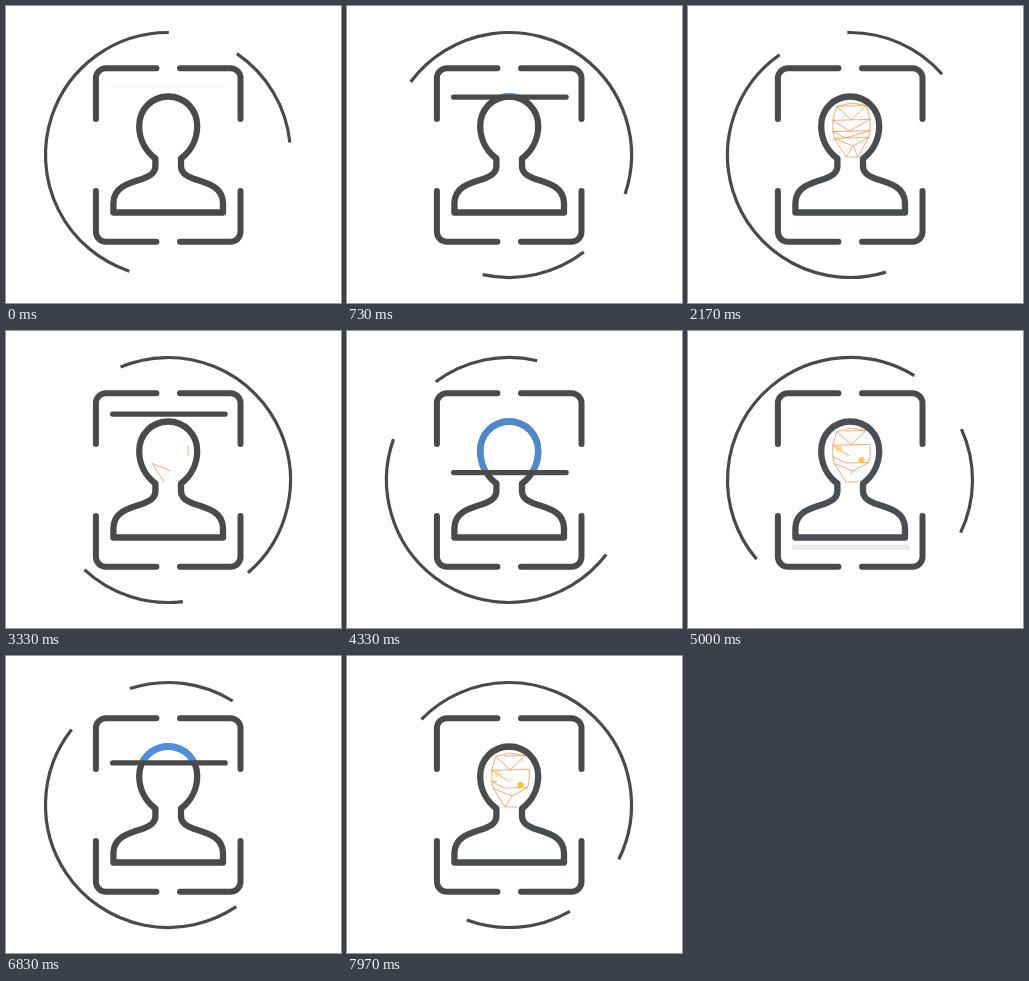
These frames come from a looping animation (335x297 px, 8000 ms). An HTML page with a canvas:

```html
<!DOCTYPE html>
<html lang="en">
<head>
<meta charset="utf-8">
<title>Face scan</title>
<style>
  html, body { margin: 0; width: 100%; height: 100%; overflow: hidden; background: #fff; }
  canvas { display: block; width: 335px; height: 297px; }
</style>
</head>
<body>
<canvas id="stage"></canvas>
<script>
const W = 335, H = 297, CX = 162.2, CY = 149;
const LOOP = 8000, STEP = 40, SCAN = 2900;
const DARK = '#4a4a4a', BLUE = '#4a90e2', ORANGE = '#f7873a', YELLOW = '#ffc21a';

const canvas = document.getElementById('stage');
const ctx = canvas.getContext('2d');
const ratio = window.devicePixelRatio || 1;
canvas.width = Math.round(W * ratio);
canvas.height = Math.round(H * ratio);

const clamp = v => Math.max(0, Math.min(1, v));
const smooth = (t, from, to) => {
  const s = clamp((t - from) / (to - from));
  return s * s * (3 - 2 * s);
};

// Cubic Bezier ease with end handles at (x1, 0) and (x2, 1).
function ease(s, x1, x2) {
  let lo = 0, hi = 1;
  for (let i = 0; i < 24; i++) {
    const u = (lo + hi) / 2, v = 1 - u;
    const x = 3 * x1 * u * v * v + 3 * x2 * u * u * v + u * u * u;
    if (x < s) lo = u; else hi = u;
  }
  return lo * lo * (3 - 2 * lo);
}

function randomizer(seed) {
  return () => (seed = (seed * 16807) % 2147483647) / 2147483647;
}

function makeCorners() {
  const path = new Path2D();
  for (const sx of [-1, 1]) {
    for (const sy of [-1, 1]) {
      const x = CX + sx * 72.3, y = CY + sy * 86.8;
      path.moveTo(x, CY + sy * 36);
      path.arcTo(x, y, CX + sx * 11.8, y, 10);
      path.lineTo(CX + sx * 11.8, y);
    }
  }
  return path;
}

// The right half of the bust, joined with its mirror image.
function makeBust() {
  const half = new Path2D(
    'M162.2 90.5 C178.5 90.5 191.2 103.5 191.2 120 C191.2 133 185 145 175 152.5' +
    ' V160 C175 167 180 170 187 172.5 C202 177 217 181 217 197 V206.5 H162.2');
  const path = new Path2D(half);
  path.addPath(half, new DOMMatrix([-1, 0, 0, 1, 2 * CX, 0]));
  return path;
}

// Rows of triangles inside an oval, closed by a fan at the chin.
function makeMesh() {
  const random = randomizer(11);
  const jitter = size => (random() - 0.5) * size;
  const edges = [], hub = [165, 140], chin = [[158, 151], [170, 151]];
  const link = (a, ...others) => others.forEach(b => edges.push([a, b]));
  let above = null;

  for (let i = 0; i < 4; i++) {
    const y = 100 + 32 * (1 - (1 - i / 3) ** 1.4);
    const half = 19 * Math.sqrt(1 - ((y - 119) / 30) ** 2);
    const left = [163.5 - half, y + 0.5], right = [163.5 + half, y - 0.5];
    const middle = [164 + jitter(14), y];
    link(left, middle);
    link(middle, right);
    if (above) {
      link(left, above.left);
      link(right, above.right);
      link(middle, above.left, above.right);
    } else {
      link([163, 97], left, right);
    }
    above = { left, middle, right };
  }
  link(hub, above.left, above.right, ...chin);
  link(chin[0], above.left, chin[1]);
  link(chin[1], above.right);

  return edges
    .map(edge => ({ edge, key: random() }))
    .sort((a, b) => a.key - b.key)
    .map(item => item.edge);
}

const corners = makeCorners(), bust = makeBust(), mesh = makeMesh();

function stroke(path, color, width, alpha = 1) {
  ctx.globalAlpha = alpha;
  ctx.strokeStyle = color;
  ctx.lineWidth = width;
  ctx.stroke(path);
  ctx.globalAlpha = 1;
}

function drawArc(start, length) {
  const from = start * Math.PI / 180;
  const arc = new Path2D();
  arc.arc(162, CY, 122.5, from, from + length * Math.PI / 180);
  ctx.lineCap = 'butt';
  stroke(arc, DARK, 3.2);
}

function drawDot(x, y, r, alpha) {
  ctx.globalAlpha = clamp(alpha);
  ctx.fillStyle = YELLOW;
  ctx.beginPath();
  ctx.arc(x, y, r, 0, 2 * Math.PI);
  ctx.fill();
  ctx.globalAlpha = 1;
}

function drawMesh(phase, cycle) {
  const leaving = phase < 500 && cycle > 0;
  const start = 1880 + cycle * 50;
  const shown = leaving ? 1 - phase / 500 : clamp((phase - start) / 300);
  if (!shown) return;

  const path = new Path2D();
  mesh.forEach(([[x, y], [x2, y2]], i) => {
    const part = clamp(shown * mesh.length - i);
    if (!part) return;
    path.moveTo(x, y);
    path.lineTo(x + (x2 - x) * part, y + (y2 - y) * part);
  });
  ctx.lineCap = 'butt';
  stroke(path, ORANGE, 0.8, 0.9);

  const pulse = mid => 1 - Math.abs(shown - mid) / 0.25;
  if (leaving) {
    drawDot(168, 110, 1.8, pulse(0.8) * 0.7);
  } else {
    drawDot(173.5, 129, 3, pulse(0.7));
    drawDot(151, 118, 3.5, pulse(0.5) * 1.5);
  }
}

function drawLine(y, alpha) {
  const line = new Path2D();
  line.moveTo(CX - 55.6, y);
  line.lineTo(CX + 57, y);
  ctx.lineCap = 'round';
  stroke(line, DARK, 5.2, alpha);
}

function draw(time) {
  const frame = Math.min(LOOP / STEP - 1, Math.floor((time + 10) / STEP));
  const clock = frame * STEP + 30;
  const cycle = Math.floor(clock / SCAN), phase = clock % SCAN;
  const y = 79.3 + 140 * ease(clamp(phase / 2300), 0.74, 0.68);
  const turn = frame * 6.01;

  ctx.setTransform(ratio, 0, 0, ratio, 0, 0);
  ctx.fillStyle = '#fff';
  ctx.fillRect(0, 0, W, H);
  ctx.lineJoin = 'round';

  drawArc(turn + 108.4, 162);
  drawArc(turn + 304.2, 50);
  ctx.lineCap = 'round';
  stroke(corners, DARK, 6);
  stroke(bust, DARK, 6.3);

  // The part already scanned turns blue, then fades back.
  ctx.save();
  ctx.beginPath();
  ctx.rect(0, 0, W, y);
  ctx.clip();
  stroke(bust, BLUE, 6.3, 1 - smooth(phase, 1250, 2300));
  ctx.restore();

  drawMesh(phase, cycle);
  drawLine(y, smooth(phase, 0, 350) * (1 - smooth(phase, 1780, 2220)));
}

const begin = performance.now();
function tick() {
  draw((performance.now() - begin) % LOOP);
  requestAnimationFrame(tick);
}
tick();
</script>
</body>
</html>
```
